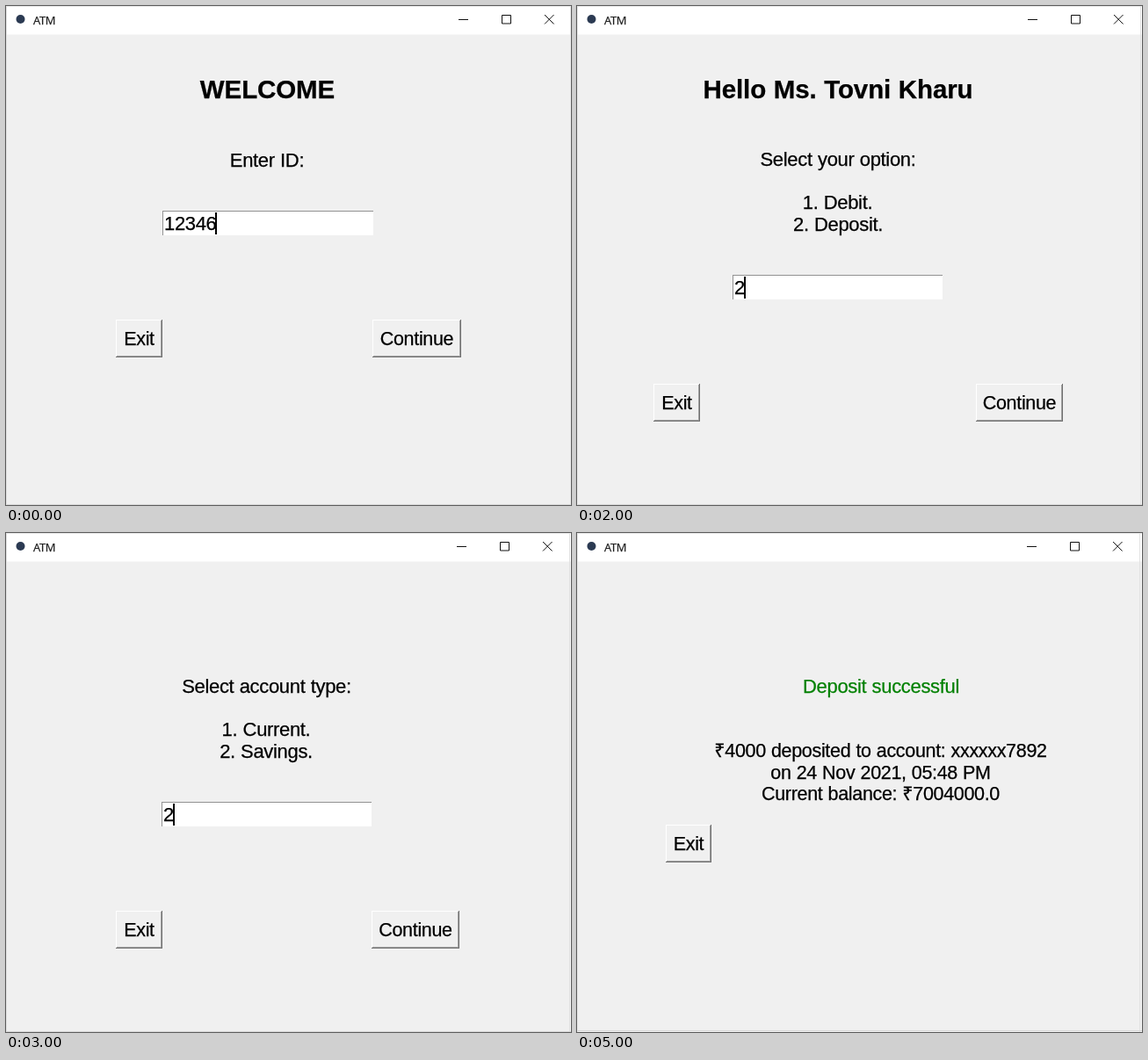
An HTML page with a canvas for the animation above (6000 ms loop, 643 by 568 pixels).

```html
<!DOCTYPE html>
<html lang="en">
<head>
<meta charset="utf-8">
<title>ATM</title>
<style>
  html, body { margin: 0; width: 100%; height: 100%; overflow: hidden; background: #f0f0f0; }
  canvas { display: block; }
</style>
</head>
<body>
<canvas id="stage" width="643" height="568"></canvas>
<script>
const ctx = document.getElementById("stage").getContext("2d");
const W = 643, H = 568, STEP = 1000;
const SANS = '"Liberation Sans", Arial, sans-serif';
const UI = '"Open Sans", "Noto Sans", sans-serif';

function rect(x, y, w, h, color) {
  ctx.fillStyle = color;
  ctx.fillRect(x, y, w, h);
}

function text(str, x, y, { size = 22, align = "center", color = "#000", weight = "", font = SANS, tracking = -0.33 } = {}) {
  ctx.font = `${weight} ${size}px ${font}`;
  ctx.textAlign = align;
  ctx.letterSpacing = `${tracking}px`;
  ctx.wordSpacing = "0.5px";
  ctx.fillStyle = ctx.strokeStyle = color;
  ctx.lineWidth = 0.25;
  ctx.fillText(str, x, y);
  ctx.strokeText(str, x, y);
}

function heading(str, x, y) {
  text(str, x, y, { size: 29.5, weight: "bold", tracking: -0.1 });
}

function entry(x, y, w, str, caretX, size) {
  rect(x, y, w, 28, "#fff");
  rect(x, y, w, 1, "#929292");
  rect(x, y, 1, 28, "#929292");
  text(str, x + 2, y + 22, { align: "left", size });
  rect(caretX, y + 2, 2, 25, "#000");
}

function button(label, x, y, w) {
  const h = 43;
  rect(x, y, w, h, "#707070");
  rect(x, y, w - 1, h - 1, "#fff");
  rect(x + 1, y + 1, w - 2, h - 2, "#a0a0a0");
  rect(x + 1, y + 1, w - 3, h - 3, "#f0f0f0");
  text(label, x + w / 2, y + 29, { size: 21.5 });
}

// Window frame; the controls sit "shift" pixels left of their widest position.
function chrome(shift) {
  rect(0, 0, W, H, "#f0f0f0");
  rect(0, 0, W, 32.5, "#fff");
  const right = W - 1 - Math.ceil(shift / 2);
  const bottom = H - (shift > 2 ? 2 : 1);
  rect(0, 0, W, 1, "#e6e6e6");
  rect(0, 0, 1, H, "#dcdcdc");
  rect(right, 0, 1, H, "#e2e2e2");
  rect(0, bottom, W, 1, "#d8d8d8");

  ctx.fillStyle = "#2b3a52";
  ctx.beginPath();
  ctx.arc(16.5, 15, 5, 0, Math.PI * 2);
  ctx.fill();
  text("ATM", 31, 20.6, { size: 13, align: "left", color: "#1c1c1c", font: UI });

  ctx.save();
  ctx.translate(-shift, 0);
  ctx.strokeStyle = "#111";
  ctx.lineWidth = 1;
  ctx.beginPath();
  ctx.moveTo(515, 15.5);
  ctx.lineTo(526, 15.5);
  ctx.rect(564.5, 10.5, 10, 9.5);
  ctx.moveTo(613, 10);
  ctx.lineTo(623.5, 20.5);
  ctx.moveTo(623.5, 10);
  ctx.lineTo(613, 20.5);
  ctx.stroke();
  ctx.restore();
}

function askId() {
  chrome(0);
  heading("WELCOME", 297.5, 105);
  text("Enter ID:", 297, 182.5);
  entry(178, 233, 240, "12346", 238);
  button("Exit", 125, 357, 53);
  button("Continue", 417, 357, 101);
}

function askPin() {
  chrome(2);
  text("Enter PIN:", 296, 182);
  entry(177, 232, 239, "xxxx", 217, 20.6);
  button("Exit", 125, 356, 53);
  button("Continue", 416, 356, 100);
}

function askOption() {
  chrome(2);
  heading("Hello Ms. Tovni Kharu", 297, 105);
  text("Select your option:", 297, 182);
  text("1. Debit.", 296.5, 231.3);
  text("2. Deposit.", 297, 255.8);
  entry(177, 306, 239, "2", 190);
  button("Exit", 87, 430, 53);
  button("Continue", 454, 430, 99);
}

function askAccount() {
  chrome(2);
  text("Select account type:", 296.5, 182);
  text("1. Current.", 296, 231.3);
  text("2. Savings.", 296, 255.8);
  entry(177, 306, 239, "2", 190);
  button("Exit", 125, 430, 53);
  button("Continue", 416, 430, 100);
}

function askAmount() {
  chrome(3);
  text("Enter amount:", 296, 181.5);
  entry(177, 231, 239, "4000", 225);
  button("Exit", 125, 355, 52);
  button("Continue", 416, 355, 99);
}

function receipt() {
  chrome(3);
  text("Deposit successful", 346, 181.5, { color: "#008000" });
  const lines = [
    "₹4000 deposited to account: xxxxxx7892",
    "on 24 Nov 2021, 05:48 PM",
    "Current balance: ₹7004000.0"
  ];
  lines.forEach((line, i) => text(line, 345.5, 255 + i * 24.5, { size: 21.5 }));
  button("Exit", 101, 332, 52);
}

const screens = [askId, askPin, askOption, askAccount, askAmount, receipt];
const start = performance.now();

function draw() {
  const t = Math.max(0, performance.now() - start);
  screens[Math.floor(t / STEP) % screens.length]();
  requestAnimationFrame(draw);
}
draw();
</script>
</body>
</html>
```
